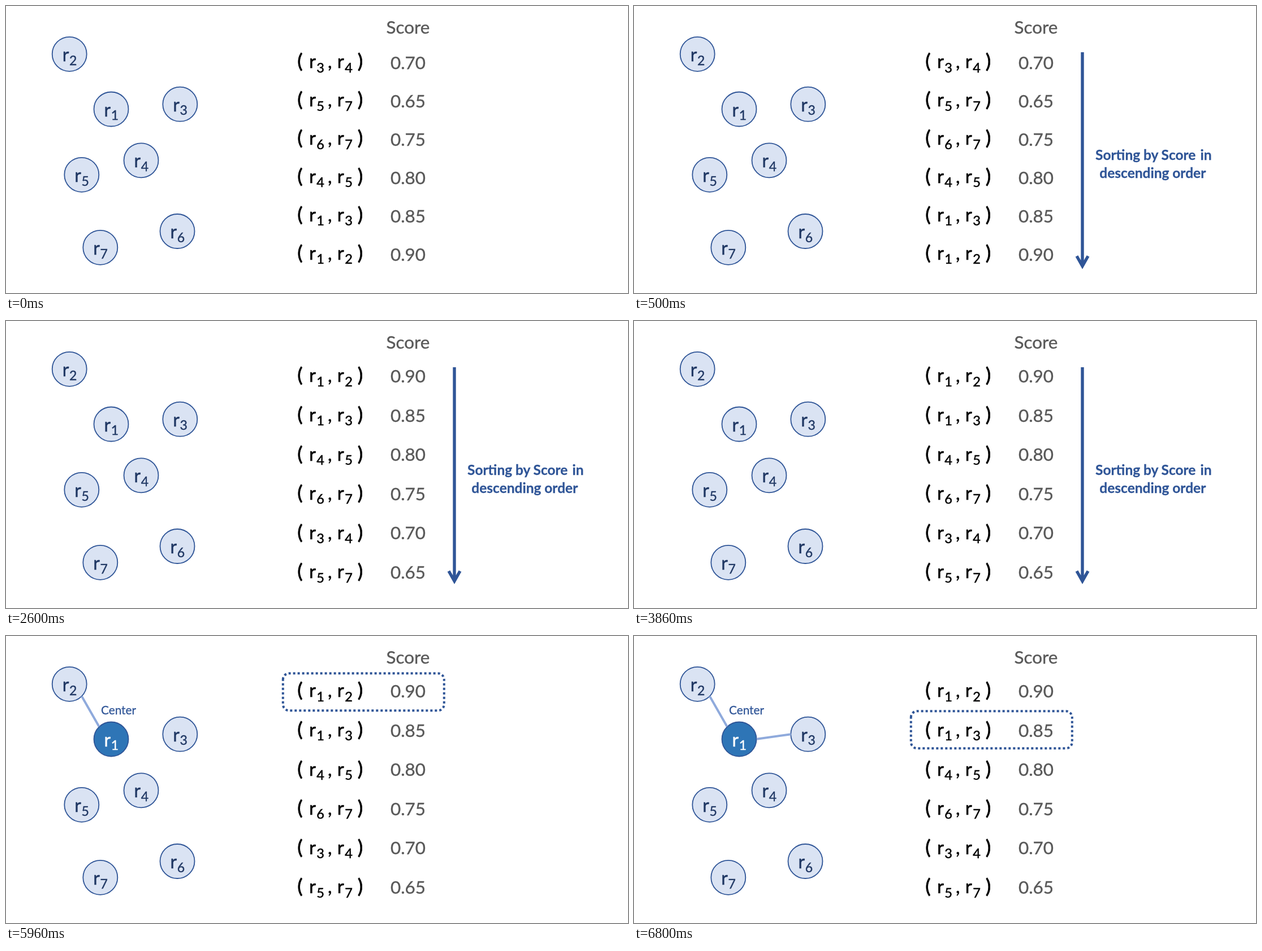
Write an HTML page that moves like this. It is 1100 by 509 pixels and loops after 8000 ms.

```html
<!DOCTYPE html>
<html lang="en">
<head>
<meta charset="utf-8">
<title>Sorting pairs by score</title>
<style>
  html, body { margin: 0; width: 100%; height: 100%; overflow: hidden; background: #fff; }
  svg { display: block; width: 100vw; height: 100vh; font-family: Lato, "Open Sans", sans-serif; }
  .score { font-size: 31.4px; fill: #595959; stroke: #595959; stroke-width: .4; text-anchor: middle; }
  .pair { font-size: 33px; stroke: #000; stroke-width: .5; }
  .paren { font-size: 35.5px; stroke: #000; stroke-width: .8; }
  .node { font-size: 32px; fill: #203864; stroke: #203864; stroke-width: .4; }
  .node circle { fill: #dae3f3; stroke: #2f5597; stroke-width: 1.8; }
  .node.center { fill: #fff; stroke: #fff; }
  .node.center circle { fill: #2e75b6; }
  .sub { font-size: 23px; }
  .pairsub { font-size: 23.5px; stroke: #000; stroke-width: .5; }
  .link { stroke: #8faadc; stroke-width: 4; }
  .note { font-size: 24.5px; font-weight: 700; fill: #2f5597; stroke: #2f5597; stroke-width: .3; }
  .tag { font-size: 20.8px; fill: #2f5597; stroke: #2f5597; stroke-width: .3; }
  .arrow, .box { fill: none; stroke: #2f5597; }
  .arrow { stroke-width: 5.4; }
  .box { stroke-width: 4; stroke-dasharray: 4 4; }
</style>
</head>
<body>
<svg id="stage" viewBox="0 0 1100 509"></svg>
<script>
const LOOP = 8000;
const T = { arrow: 500, sorted: 2600, first: 4700, second: 6800 };
const stage = document.getElementById('stage');

function add(parent, tag, attrs, text) {
  const el = document.createElementNS('http://www.w3.org/2000/svg', tag);
  for (const key in attrs) el.setAttribute(key, attrs[key]);
  if (text !== undefined) el.textContent = text;
  parent.appendChild(el);
  return el;
}

function group(cls) {
  return add(stage, 'g', cls ? { class: cls } : {});
}

function words(parent, cls, y, list) {
  for (const [x, word] of list) add(parent, 'text', { class: cls, x, y }, word);
}

function show(el, on) {
  el.style.display = on ? '' : 'none';
}

// Items on the left
const spots = [[186, 183], [112.2, 85.3], [307.8, 174.2], [239, 273.8], [133.8, 299.3], [303, 399.5], [166.8, 428.3]];
const nodes = spots.map(([x, y], i) => {
  const g = group('node');
  add(g, 'circle', { cx: x, cy: y, r: 30.5 });
  add(g, 'text', { x: x - 12.5, y: y + 12.5 }, 'r');
  add(g, 'text', { class: 'sub', x: x - 0.2, y: y + 19.2 }, i + 1);
  return g;
});

const link12 = add(stage, 'line', { class: 'link', x1: 134, y1: 107, x2: 164.5, y2: 160.5 });
const link13 = add(stage, 'line', { class: 'link', x1: 217, y1: 182.7, x2: 277.5, y2: 174.2 });
const tag = add(stage, 'text', { class: 'tag', x: 168, y: 139.3 }, 'Center');

// Table on the right
add(stage, 'text', { class: 'score', x: 711, y: 48.5 }, 'Score');
const rows = [[3, 4, 0.7], [5, 7, 0.65], [6, 7, 0.75], [4, 5, 0.8], [1, 3, 0.85], [1, 2, 0.9]];
const byScore = [...rows].sort((a, b) => b[2] - a[2]);

function table(list, top, step, scoreDrop) {
  const g = group();
  list.forEach(([a, b, score], i) => {
    const y = top + i * step;
    words(g, 'paren', y, [[515.2, '('], [621.8, ')']]);
    words(g, 'pair', y, [[536, 'r'], [569, ','], [585.8, 'r']]);
    words(g, 'pairsub', y + 7.3, [[549.2, a], [599.2, b]]);
    add(g, 'text', { class: 'score', x: 711, y: y + scoreDrop }, score.toFixed(2));
  });
  return g;
}

const unsorted = table(rows, 110.4, 67.9, 1.7);
const sorted = table(byScore, 108.3, 69.6, 0.7);

// Sorting arrow and caption
const sorting = group();
add(sorting, 'path', { class: 'arrow', d: 'M793 82V461M783 443.5L793 461.3L803 443.5' });
words(sorting, 'note', 272.8, [[816, 'Sorting'], [901, 'by'], [932.5, 'Score'], [1001.5, 'in']]);
words(sorting, 'note', 304.6, [[823.3, 'descending'], [952.3, 'order']]);

// Dots start at the left edge, below the top corner
const box = add(stage, 'path', {
  class: 'box',
  d: 'M489.8 11a11 11 0 0 1 11 -11h263a11 11 0 0 1 11 11v44a11 11 0 0 1 -11 11h-263a11 11 0 0 1 -11 -11z'
});

function draw(t) {
  const linked = t >= T.first;
  const next = t >= T.second;
  show(unsorted, t < T.sorted);
  show(sorted, t >= T.sorted);
  show(sorting, t >= T.arrow && !linked);
  for (const el of [link12, tag, box]) show(el, linked);
  show(link13, next);
  box.setAttribute('transform', `translate(0 ${next ? 133.2 : 66.2})`);
  nodes[0].classList.toggle('center', linked);
}

const start = performance.now();
function tick() {
  draw((performance.now() - start) % LOOP);
  requestAnimationFrame(tick);
}
tick();
</script>
</body>
</html>
```
